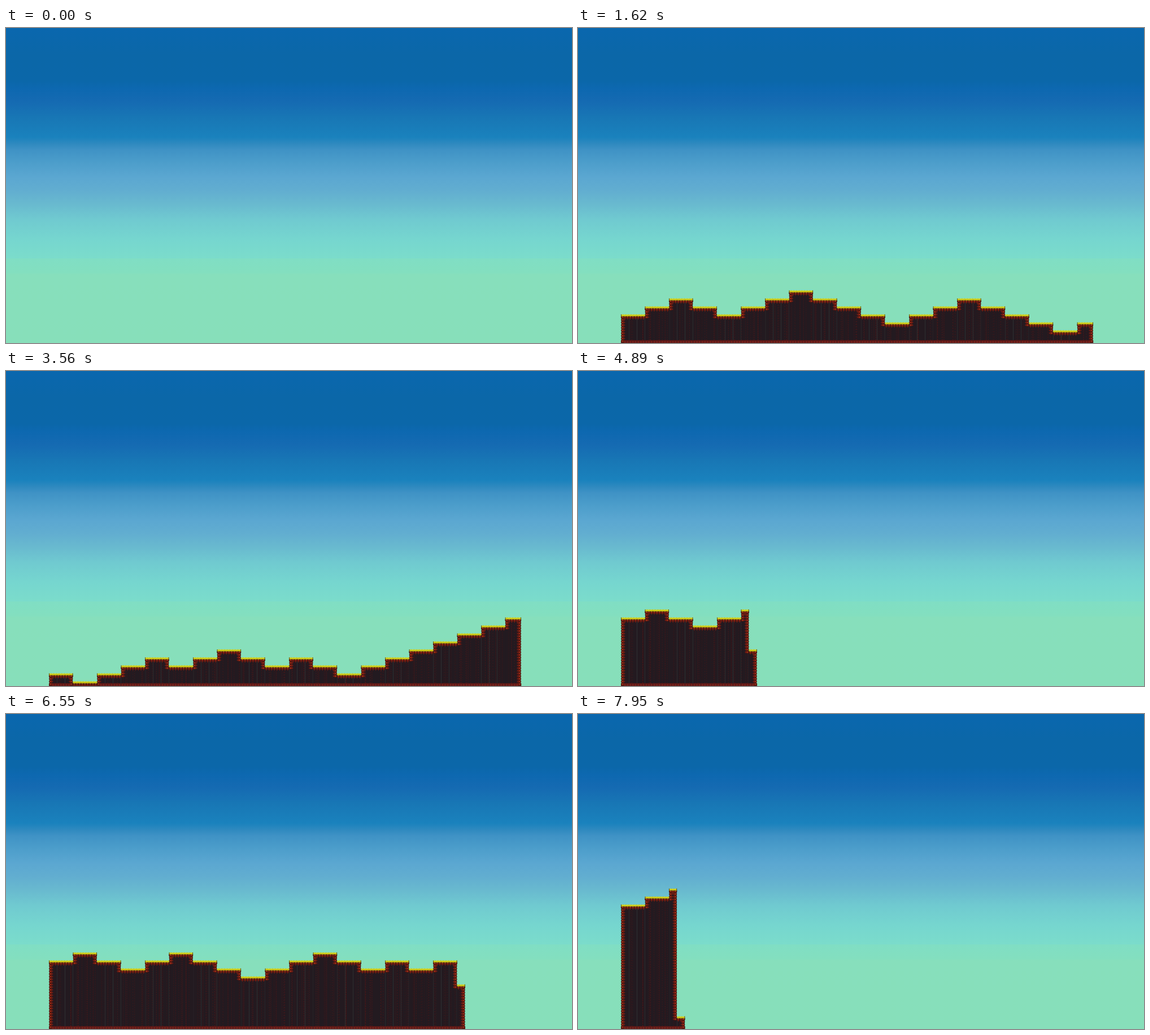
An HTML page with a canvas that plays this animation: 1002 px wide and 559 px high, repeating every 8000 ms.

```html
<!DOCTYPE html>
<html lang="en">
<head>
<meta charset="utf-8">
<title>Growing terrain</title>
<style>
html, body { margin: 0; width: 100%; height: 100%; overflow: hidden; }
canvas { display: block; width: 1002px; height: 559px; }
</style>
</head>
<body>
<canvas id="stage" width="1002" height="559"></canvas>
<script>
const ctx = document.getElementById('stage').getContext('2d');
const WIDTH = 1002, HEIGHT = 559, LOOP = 8000;
const TILE = 14.17, LEFT = 76, COLUMNS = 59, FLOOR = 554;
const TICK = 45.9, LEAD = 11, TILES_PER_TICK = 8.42;
const BUMP = TILE / 3;

// Each terrain lists its height in tiles for every three columns.
const terrains = [
  { start: 130, first: 5.3, steps: [4, 5, 6, 5, 4, 5, 6, 7, 6, 5, 4, 3, 4, 5, 6, 5, 4, 3, 2, 3] },
  { start: 2260, first: 5.6, steps: [2, 1, 2, 3, 4, 3, 4, 5, 4, 3, 4, 3, 2, 3, 4, 5, 6, 7, 8, 9] },
  { start: 4120, first: 6.9, steps: [9, 10, 9, 8, 9, 10, 9, 8, 7, 8, 9, 10, 9, 8, 9, 8, 9, 10, 11, 10] },
  { start: 7340, first: 9.5, steps: [16, 17, 18] }
];

const sky = ctx.createLinearGradient(0, 0, 0, HEIGHT);
[[0, '#0a67ae'], [48, '#0b67a8'], [94, '#0b67a9'], [108, '#0d68b0'], [130, '#156ab2'],
 [160, '#1877b5'], [194, '#1a82bd'], [205, '#2e89bf'], [216, '#3f92c5'], [240, '#4d9ecb'],
 [265, '#5ba7d1'], [290, '#62aed0'], [310, '#68b8cf'], [340, '#70cad0'], [375, '#76d6cf'],
 [408.5, '#7bdccb'], [409, '#80dec4'], [434, '#83dfbf'], [438, '#87dfbc'], [559, '#87dfba']
].forEach(([y, color]) => sky.addColorStop(y / HEIGHT, color));

const columnX = c => LEFT + c * TILE;
const topY = h => 551.3 - (h - 1) * TILE;

function noise(a, b) {
  const v = Math.sin(a * 127.1 + b * 311.7) * 43758.5453;
  return v - Math.floor(v);
}

function rect(color, x, y, w, h) {
  ctx.fillStyle = color;
  ctx.fillRect(x, y, w, h);
}

function dot(color, x, y, r) {
  ctx.fillStyle = color;
  ctx.beginPath();
  ctx.arc(x, y, r, 0, 7);
  ctx.fill();
}

// Tiles fill a column from the bottom up, then move on to the next one.
function heightsAt(steps, tiles) {
  return Array.from({ length: COLUMNS }, (_, c) => {
    const h = Math.min(steps[Math.floor(c / 3)] || 0, tiles);
    tiles -= h;
    return h;
  });
}

// Bumpy earth along an edge; (nx, ny) points into the ground.
function rim(x, y, length, nx, ny) {
  const tx = Math.abs(ny), ty = Math.abs(nx);
  const at = (s, d) => [x + tx * s + nx * d, y + ty * s + ny * d];
  const [ax, ay] = at(0, 1), [bx, by] = at(length, 5.5);
  rect('#58170f', ax, ay, bx - ax, by - ay);
  for (let s = BUMP / 2; s < length; s += BUMP) {
    dot('#45140f', ...at(s, 2.6), 2.5);
    dot('#922c19', ...at(s, 2.8), 1.7);
    ctx.fillStyle = '#711d14';
    ctx.beginPath();
    ctx.moveTo(...at(s - 2, 4.6));
    ctx.lineTo(...at(s + 2, 4.6));
    ctx.lineTo(...at(s, 8));
    ctx.fill();
  }
}

function drawCore(c, h, leftH, rightH) {
  const x = columnX(c), y = topY(h);
  const a = leftH < h ? 1.2 : 0, b = rightH < h ? 1.2 : 0;
  rect('#231a20', x + a, y + 1, TILE - a - b + 0.3, HEIGHT - y);
  // keep shared sides solid down to the floor
  for (const [near, edge] of [[leftH, x], [rightH, x + TILE - 1.5]]) {
    if (near && near < h) rect('#231a20', edge, topY(near) + 2, 1.8, HEIGHT);
  }
  for (let i = 0; i < 4; i++) {
    const strength = 0.12 + 0.4 * noise(c, i + 9);
    ctx.strokeStyle = `rgba(105,25,24,${strength})`;
    ctx.setLineDash([2, 1 + 2 * noise(i, c)]);
    ctx.beginPath();
    const sx = x + 1 + noise(c, i) * 12;
    ctx.moveTo(sx, FLOOR);
    ctx.lineTo(sx, Math.min(FLOOR, y + 8));
    ctx.stroke();
  }
  rect('#5c1a18', x, FLOOR, TILE + 0.2, HEIGHT - FLOOR);
  for (let s = BUMP / 2; s < TILE; s += BUMP) dot('#7b221a', x + s, 557, 1.5);
}

function drawEdges(c, h, leftH, rightH) {
  const x = columnX(c), y = topY(h);
  const sideLength = near => (near ? topY(near) + 6 : HEIGHT) - y - 2;
  rim(x, y + 1, TILE, 0, 1);
  if (leftH < h) rim(x, y + 2, sideLength(leftH), 1, 0);
  if (rightH < h) rim(x + TILE, y + 2, sideLength(rightH), -1, 0);
}

function drawGrass(c, h, leftH, rightH) {
  const x = columnX(c), y = topY(h);
  const a = leftH < h ? 0.3 : 0, b = rightH < h ? 0.6 : 0;
  rect('#77640f', x + a, y + 1, TILE - a - b + 0.2, 2.4);
  rect('#d8d51d', x + a, y - 0.3, TILE - a - b + 0.2, 2.5);
  for (let s = BUMP / 2; s < TILE; s += BUMP) {
    rect('#b5ab18', x + s - 0.7, y + 1.7, 1.4, 1.6);
    rect('#aeb41c', x + s + 1, y - 0.8, 1, 0.8);
  }
  if (leftH < h) rect('#5c4a10', x, y - 0.6, 1, 2.6);
  if (rightH < h) rect('#5c4a10', x + TILE - 1, y - 0.6, 1, 2.6);
}

function drawTerrain(heights) {
  for (const layer of [drawCore, drawEdges, drawGrass]) {
    heights.forEach((h, c) => {
      if (h) layer(c, h, heights[c - 1] || 0, heights[c + 1] || 0);
    });
  }
}

function frame() {
  const t = performance.now() % LOOP;
  rect(sky, 0, 0, WIDTH, HEIGHT);
  const terrain = terrains.filter(item => t >= item.start).pop();
  if (terrain) {
    const tick = Math.floor((t - terrain.start + LEAD) / TICK);
    const tiles = Math.round(terrain.first + tick * TILES_PER_TICK);
    drawTerrain(heightsAt(terrain.steps, tiles));
  }
  requestAnimationFrame(frame);
}
frame();
</script>
</body>
</html>
```
